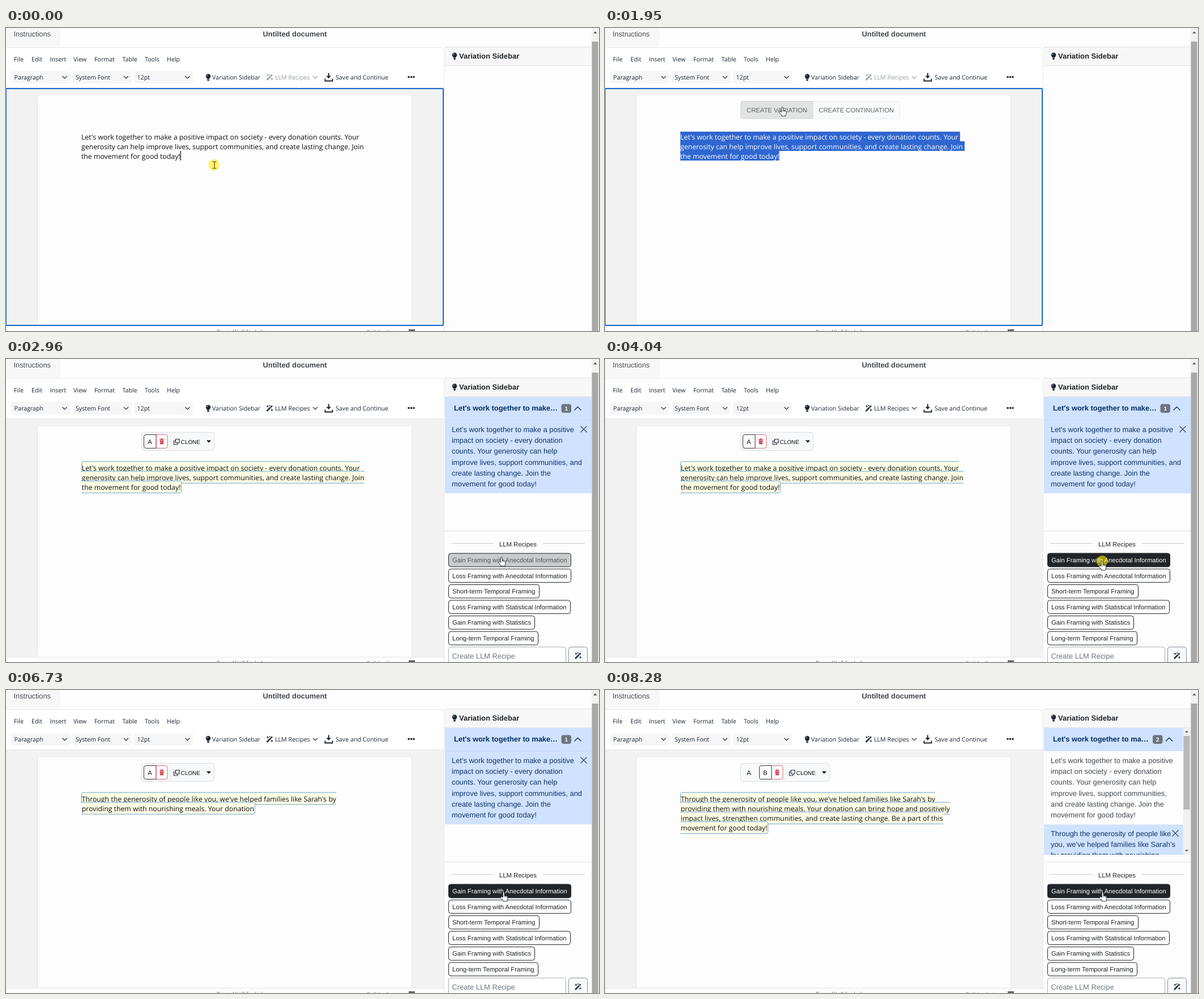
These frames come from a looping animation (1047 px wide and 535 px high, 8470 ms). An HTML page:

```html
<!DOCTYPE html>
<html lang="en">
<head>
<meta charset="utf-8">
<title>Variation editor</title>
<style>
html, body { margin: 0; width: 100%; height: 100%; overflow: hidden; background: #fdfdfd; }
svg { display: block; width: 1047px; height: 535px; font-family: "Open Sans", "Noto Sans", sans-serif; fill: #1a2533; text-rendering: geometricPrecision; }
text { white-space: pre; }
.a { font-family: "Liberation Sans", Arial, sans-serif; }
.b { font-family: "Liberation Sans", Arial, sans-serif; font-weight: bold; }
.l { fill: none; stroke: #222f3e; stroke-width: 1.2; }
#draft { fill: #0c0c0c; }
</style>
</head>
<body>
<svg id="stage" viewBox="0 0 1047 535"></svg>
<script>
const LOOP = 8470, LEFT = 133, TOP = 183, LEAD = 17.2, BODY = 12.29, BAR = 17;
const stage = document.getElementById('stage');
const $ = id => document.getElementById(id);
const clamp = v => Math.min(1, Math.max(0, v));
const ramp = (t, a, b) => clamp((t - a) / (b - a));

// Markup helpers
const text = (x, y, s, size, more = '') => `<text x="${x}" y="${y}" font-size="${size}" ${more}>${s}</text>`;
const rect = (x, y, w, h, fill, more = '') => `<rect x="${x}" y="${y}" width="${w}" height="${h}" fill="${fill}" ${more}/>`;
const path = (d, more = 'class="l"') => `<path d="${d}" ${more}/>`;
const group = (id, s, more = '') => `<g id="${id}" ${more}>${s}</g>`;
const at = (x, y, s) => `<g transform="translate(${x} ${y})">${s}</g>`;
const lines = (x, y, step, list, size, more) => list.map((s, i) => text(x, y + i * step, s, size, more)).join('');
const box = (x, y, w, h, fill, stroke, r = 4) => rect(x, y, w, h, fill, `stroke="${stroke}" rx="${r}"`);
const chevron = (x, y, up = 1) => path(`M${x - 4} ${y - 2 * up}l4 ${4 * up} 4 ${-4 * up}`);
const cross = (x, y) => path(`M${x - 5.5} ${y - 5.5}l11 11m0-11l-11 11`, 'fill="none" stroke="#45546b" stroke-width="1.4"');

const bulb = (x, y) => at(x, y,
  path('M0-6a4.3 4.3 0 0 1 4.3 4.3C4.3.6 2.3 1 2 3h-4C-2.3 1-4.3.6-4.3-1.7A4.3 4.3 0 0 1 0-6zM-2 3.8h4V5L1 6.2h-2L-2 5z', '') +
  path('M-2.3-1.8Q-2.2-3.8 0-4', 'fill="none" stroke="#fff" stroke-width=".8"'));
const wand = (x, y) => at(x, y,
  path('M-5 5L4.5-4.5', 'fill="none" stroke="#222f3e" stroke-width="2.6"') +
  path('M1.2-2.8l1.6 1.6', 'fill="none" stroke="#fff" stroke-width=".9"') +
  path('M-3.5-5.5v4M-5.5-3.5h4M0-6v2M-1-5h2M4 1v4M2 3h4'));

const chrome = () =>
  rect(0, 0, 1047, 535, '#fdfdfd') +
  rect(0, 0, 96, 33, '#f7f7f7') +
  text(13.5, 15, 'Instructions', 12.8, 'class="a" fill="#4a4f54"') +
  text(453.5, 15, 'Untilted document', 12.9, 'class="b" fill="#43484d"') +
  path('M0 34.5H766q7.5 0 7.5 8V535', 'fill="#fff" stroke="#e9e9e9"') +
  rect(0, 35, 765, 70, '#fff') +
  [[14, 'File'], [45, 'Edit'], [77.5, 'Insert'], [119, 'View'], [156, 'Format'], [205.5, 'Table'], [245, 'Tools'], [284, 'Help']]
    .map(m => text(m[0], 59, m[1], 10.7)).join('') +
  [[9, 'Paragraph'], [117.5, 'System Font'], [226, '12pt']].map(([x, s]) =>
    rect(x, 76, 104, 22, '#f6f6f7', 'rx="2"') + text(x + 5.5, 91, s, 10.7) + chevron(x + 94.5, 87)).join('') +
  bulb(357, 87) + text(364, 91, 'Variation Sidebar', 10.65) +
  group('recipes', wand(465.5, 87) + text(475, 91, 'LLM Recipes', 10.7) + chevron(546, 87)) +
  path('M568.7 79.5h2v5h3.3l-4.3 4.6-4.3-4.6h3.3z', '') +
  path('M563.4 89.5v4h13v-4', 'fill="none" stroke="#1a2533" stroke-width="1.9"') +
  text(582, 91, 'Save and Continue', 10.7) +
  [711, 715.5, 720].map(x => `<circle cx="${x}" cy="86.5" r="1.8"/>`).join('') +
  rect(0, 106, 773, 420, '#f2f2f2') +
  rect(55, 118, 662, 408, '#e8e8e8') + rect(56, 118.5, 660, 408, '#fdfdfd') +
  path('M0 105.5H773M0 526.5H773', 'stroke="#e6e6e6"') +
  rect(0, 527, 773, 8, '#fdfdfd') +
  text(372, 540.3, 'Press Alt+0 for help', 9.6, 'fill="#666"') +
  text(637, 540.3, 'Built by the team', 8.8, 'fill="#666"') +
  rect(711, 532, 11, 11, '#5f6468') +
  path('M.5 106V535', 'stroke="#ececec"') +
  group('focus', rect(0, 107, 772, 418, 'none', 'stroke="#1a6cd0" stroke-width="2" rx="1"'));

const sideHead = () =>
  rect(774, 34, 260, 33, '#f7f7f7') + path('M774 33.5H1034M774 66.5H1034', 'stroke="#e4e4e4"') +
  bulb(792, 49.5) + text(800, 54, 'Variation Sidebar', 13, 'class="b" fill="#212529"') +
  rect(1034, 0, 13, 535, '#f1f1f1') + rect(1034.5, 24, 11, 511, '#a8a8a8') +
  path('M1037 9.5l3.3-3.5 3.3 3.5z', 'fill="#505050"');

const accordion = (title, n, x) =>
  rect(775, 67, 259, 41, '#cfe2ff') +
  text(791, 91, title, 12.85, 'class="b" fill="#052c65"') +
  rect(x, 79.5, 17.5, 15.5, '#6c757d', 'rx="4"') +
  text(x + 8.7, 91, n, 10, 'class="b" fill="#fff" text-anchor="middle"') +
  path(`M${x + 23} 90.5l6-6 6 6`, 'fill="none" stroke="#052c65" stroke-width="1.3"');

const ask = ["Let's work together to make a positive", 'impact on society - every donation'];
const blueText = 'class="a" fill="#123468"', greyText = 'class="a" fill="#464b50"';

const sideOne = () => accordion("Let's work together to make…", 1, 980.5) +
  rect(775, 107.5, 259, 129.5, '#cfe2ff') + path('M775 107.5H1034', 'stroke="#c5d8f5"') +
  lines(787, 128.6, 19.3, [...ask, 'counts. Your generosity can help', 'improve lives, support communities, and',
    'create lasting change. Join the', 'movement for good today!'], 12.9, blueText) + cross(1020, 124);

const sideTwo = () => `<clipPath id="list"><path d="M774 67h260v224H774z"/></clipPath><g clip-path="url(#list)">` +
  accordion("Let's work together to ma…", 2, 967) +
  lines(787, 128.6, 19.3, [...ask, 'counts. Your generosity can help', 'improve lives, support communities,',
    'and create lasting change. Join the', 'movement for good today!'], 12.9, greyText) +
  rect(775, 237.5, 246, 60, '#cfe2ff') +
  lines(787, 257.6, 19.3, ['Through the generosity of people like', "you, we've helped families like Sarah's",
    'by providing them with nourishing'], 12.9, blueText) + cross(1007, 253) +
  rect(1020.5, 67, 13.5, 224, '#f1f1f1') + rect(1021.5, 81, 11, 130, '#b9b9b9') +
  path('M1024 75l3-3.5 3 3.5zM1024 282l3 3.5 3-3.5z', 'fill="#606060"') + '</g>';

const names = [['Gain Framing with Anecdotal Information', 216], ['Loss Framing with Anecdotal Information', 216],
  ['Short-term Temporal Framing', 160], ['Loss Framing with Statistical Information', 215],
  ['Gain Framing with Statistics', 152], ['Long-term Temporal Framing', 158]];
const option = (i, fill, ink) => box(781.5, 343.2 + i * 27.6, names[i][1], 23.6, fill, '#212529') +
  text(788, 359 + i * 27.6, names[i][0], 11.22, `class="a" fill="${ink}"`);

const recipePanel = () =>
  path('M774 303.5H1034', 'stroke="#dee2e6"') +
  path('M787 325.5H860M949 325.5H1022', 'stroke="#999" stroke-dasharray="1.5 1.5"') +
  text(871, 330.5, 'LLM Recipes', 11.3, 'class="a" fill="#212529"') +
  names.map((_, i) => option(i, '#fdfdfd', '#212529')).join('') +
  group('hot', option(0, '#212529', '#fff')) +
  box(781.5, 508.5, 207, 40, '#fff', '#a9afb5') +
  text(787.5, 529, 'Create LLM Recipe', 12.9, 'class="a" fill="#6c757d"') +
  box(993.5, 508.5, 33, 40, '#f8f9fa', '#8a9299') + wand(1010, 524);

const createBar = () =>
  box(239.5, 129.5, 281, 30.5, '#f8f9fa', '#dee2e6') +
  group('over', path('M367.5 129.5H243.5q-4 0-4 4v22.5q0 4 4 4h124z', 'fill="#d3d4d5" stroke="#c0c2c4"')) +
  path('M367.5 130v30', 'stroke="#d5d7d9"') +
  text(250, 149.3, 'CREATE VARIATION', 11.27, 'class="a" fill="#111"') +
  text(377.3, 149.3, 'CREATE CONTINUATION', 11.27, 'class="a" fill="#111"');

const letterBox = (x, id) => path(`M${x} 133.5h-18q-3.5 0-3.5 3.5v17q0 3.5 3.5 3.5h18z`,
  `id="${id}" fill="#fdfdfd" stroke="#343a40"`);
const variantBar = (dx, id) =>
  box(239.5, 129.5, 128 + dx, 32, '#f7f8f9', '#dee0e3') +
  (dx ? letterBox(265, 'fading') : '') + letterBox(265 + dx, id) +
  text(254, 149.5, 'A', 11.2, 'class="a" fill="#111" text-anchor="middle"') +
  (dx ? text(254 + dx, 149.5, 'B', 11.2, 'class="a" fill="#111" text-anchor="middle"') : '') +
  at(dx, 0,
    path('M265.5 133.5h16q3.5 0 3.5 3.5v17q0 3.5-3.5 3.5h-16z', 'fill="#fdfdfd" stroke="#dc6a74"') +
    path('M271 141.5h8v1.3h-8zM273.5 140.3h3v1.2h-3zM271.6 143.4h6.8l-.5 7h-5.8z', 'fill="#cf3545"') +
    path('M273.8 144.5v4.5M276.2 144.5v4.5', 'stroke="#f5c9cd" stroke-width=".7"') +
    path('M290 130v31', 'stroke="#eceef0"') +
    path('M299.5 141.5h6.5v6.5h-6.5zM299.5 144.5h-3v6.5h6.5v-3') +
    text(308.8, 149.6, 'CLONE', 9.9, 'class="a" fill="#111"') +
    path('M354 143.5h8l-4 4.6z', 'fill="#111"'));

const pointers = () =>
  group('ring', '<circle r="10" fill="#fff000" fill-opacity=".58"/>') +
  group('pointer',
    group('beam', path('M-2.5-6h2.6l.9 1 .9-1H4.5M1-5V5M-2.5 6h2.6l.9-1 .9 1H4.5', 'fill="none" stroke="#3a3410" stroke-width="1.1"')) +
    group('arrow', path('M0 0V12.2l2.8-2.6 2 4.6 2.2-1-2-4.4h3.8z', 'fill="#fff" stroke="#333" stroke-width=".9"')) +
    group('hand', path('M-1.5 9V1.3a1.4 1.4 0 0 1 2.8 0V6l4 .9q1.7.4 1.7 2v2.6q0 1.5-.9 2.8V16H-1.2v-1.5L-5.2 10.3q-.9-1.3.3-2t2 .1z',
      'fill="#fff" stroke="#222" stroke-width=".9"') +
      path('M1.3 6V9M4 6.8V9', 'stroke="#222" stroke-width=".7"')));

stage.innerHTML = chrome() + sideHead() + group('one', sideOne()) + group('two', sideTwo()) + group('panel', recipePanel()) +
  group('draft', '') + group('create', createBar()) + group('barA', variantBar(0, 'pickA')) + group('barB', variantBar(29, 'pickB')) +
  pointers() + text(0, 0, '', BODY, 'id="probe" visibility="hidden"');

const measure = s => { $('probe').textContent = s; return $('probe').getComputedTextLength(); };

const first = ["Let's work together to make a positive impact on society - every donation counts. Your",
  'generosity can help improve lives, support communities, and create lasting change. Join',
  'the movement for good today!'];
const tokens = ("Through| the| generosity| of| people| like| you,| we|'ve| helped| families| like| Sarah|'s by|" +
  '\nproviding them with| nourishing| meals.| Your| donation| can| bring| hope| and| positively|' +
  '\nimpact| lives,| strengthen| communities,| and| create| lasting| change.| Be| a| part| of| this|' +
  '\nmovement for| good today!').split('|');
const tokenTime = i => i < 14 ? 5430 + 68.4 * i : 6460 + 67.3 * (i - 14);
const baseline = i => TOP + 13.7 + i * LEAD;
const firstWidths = first.map(measure);

// Plain paragraph with the part behind the dragged pointer selected
function selectable(x, y) {
  const row = y < TOP + BAR ? 0 : y < TOP + 2 * BAR ? 1 : 2;
  const ends = firstWidths.map((w, i) => LEFT + w + (i < 2 ? 3 : 0));
  const from = Math.min(Math.max(x, LEFT), ends[row]);
  let marks = '';
  for (let i = row; i < 3; i++) {
    const a = i === row ? from : LEFT, b = ends[i];
    if (b - a > .1) marks += rect(a, TOP + i * BAR, b - a, BAR, '#2f66d0');
  }
  const copy = more => first.map((s, i) => text(LEFT, baseline(i), s, BODY, more)).join('');
  return copy('') + (marks
    ? `<clipPath id="chosen">${marks}</clipPath>${marks}<g clip-path="url(#chosen)">${copy('fill="#fff"')}</g>`
    : rect(ends[2], TOP + 2 * BAR, 1.2, BAR, '#000'));
}

// Inline box broken over lines; each line paints over the one above
function boxed(list) {
  return list.map((s, i) => {
    const last = i === list.length - 1, head = i === 0;
    const t = 181 + i * LEAD, b = t + 21, r = LEFT + 1 + measure(s) + (last ? 1 : 0), e = last ? r - 3 : r, l = LEFT + .4;
    let d = head ? `M${e} ${t}H${l + 3}q-3 0-3 3V${b - 3}q0 3 3 3H${e}` : `M${l} ${t}H${e}M${l} ${b}H${e}`;
    if (last) d += `M${e} ${t}q3 0 3 3V${b - 3}q0 3-3 3`;
    return rect(l, t, r - l, b - t, '#fefee6', 'rx="2"') + path(d, 'fill="none" stroke="#6ba3cf"') +
      text(LEFT + .8, baseline(i), s, BODY);
  }).join('');
}

const smooth = p => p * p * (3 - 2 * p), out = p => 1 - (1 - p) ** 2;
const track = [[0, 367, 242], [90, 367, 242], [470, 106, 196, smooth], [610, 106, 196], [1080, 313, 134.5, smooth],
  [1220, 313, 139.5, smooth], [2090, 313, 139.5], [2480, 825, 323.5, out], [2900, 872, 342, out], [3100, 877.7, 357, out],
  [5030, 877.7, 357], [5031, 878.7, 357], [LOOP, 878.7, 357]];
function place(t) {
  const i = track.findIndex(k => k[0] > t), a = track[i - 1], b = track[i];
  const p = (b[3] || (v => v))(ramp(t, a[0], b[0]));
  return [a[1] + (b[1] - a[1]) * p, a[2] + (b[2] - a[2]) * p];
}

const show = (id, on) => $(id).style.display = on ? '' : 'none';
const fade = (id, v) => $(id).style.opacity = v;
const move = (id, x, y) => $(id).setAttribute('transform', `translate(${x} ${y})`);
let drawn = '';

function paint(t) {
  const [x, y] = place(t), made = t >= 2090, split = t >= 8140;
  const count = tokens.filter((_, i) => t >= tokenTime(i)).length;

  const key = made ? 'v' + count : 's' + Math.min(t, 470);
  if (key !== drawn) {
    $('draft').innerHTML = !made ? selectable(...place(Math.min(t, 470)))
      : boxed(count ? tokens.slice(0, count).join('').split('\n').map(s => s.trim()) : first);
    drawn = key;
  }

  show('focus', !made);
  show('panel', made);
  show('one', made && !split);
  show('two', split);
  show('create', t >= 680 && !made);
  show('barA', made && !split);
  show('barB', split);
  fade('recipes', made ? 1 : .45);
  fade('over', ramp(t, 940, 1080));
  fade('create', 1 - .35 * ramp(t, 1615, 1950));
  fade('hot', ramp(t, 2920, 3100));
  fade('fading', 1 - ramp(t, 8140, 8280));

  const kind = made ? (x < 716 ? 'beam' : y > 343 ? 'hand' : 'arrow') : t > 680 && x > 239 && y < 160 ? 'hand' : 'beam';
  for (const k of ['beam', 'arrow', 'hand']) show(k, k === kind);
  show('ring', t < 610 || (t >= 1480 && t < 1615) || (t >= 4040 && t < 4170));
  move('ring', x, y);
  move('pointer', x, y);
}

const start = performance.now();
function tick() {
  paint((performance.now() - start) % LOOP);
  requestAnimationFrame(tick);
}
tick();
</script>
</body>
</html>
```
